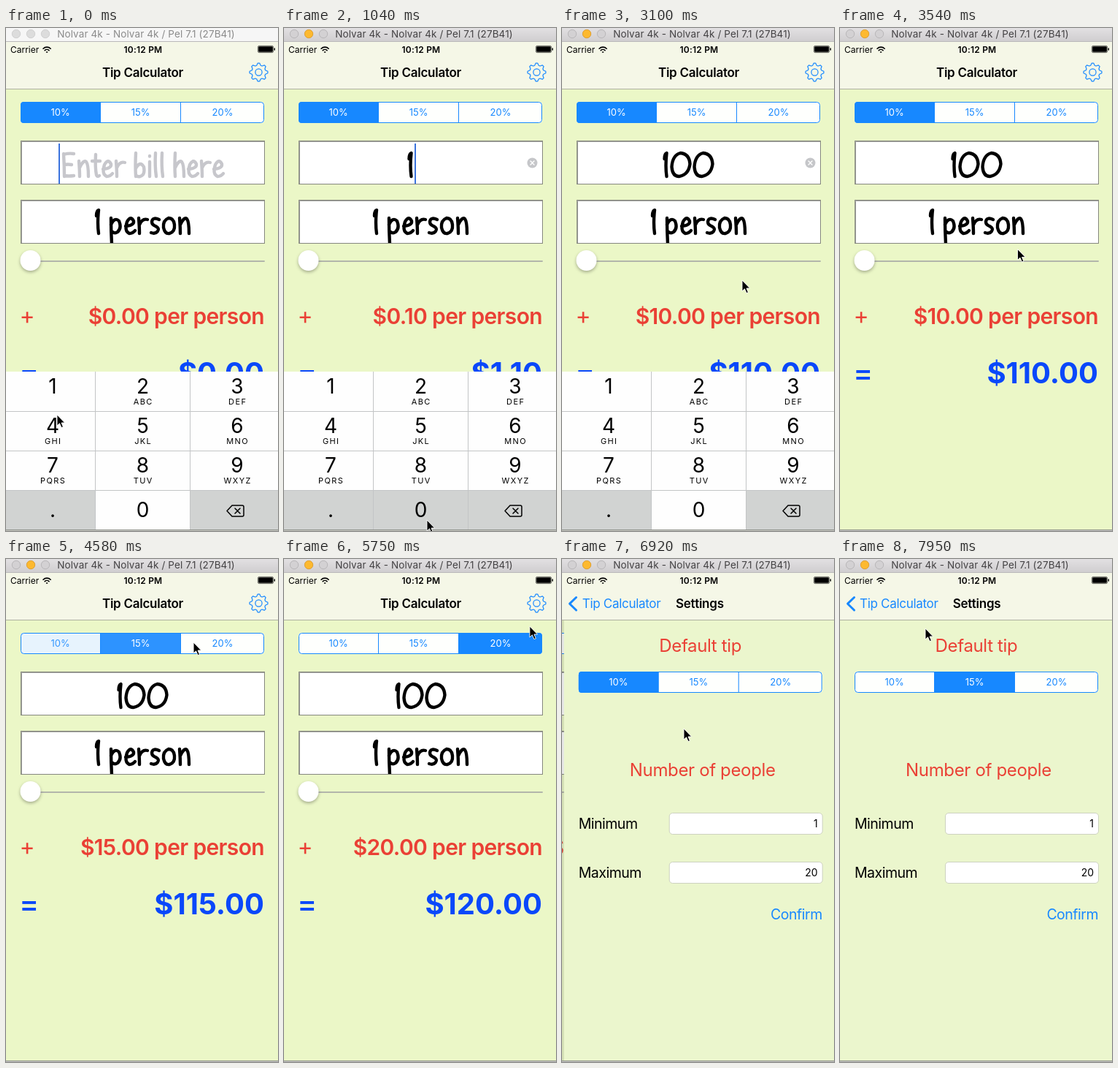
An HTML page that plays this animation: 373x688 px, repeating every 8 s.

```html
<!DOCTYPE html>
<html lang="en">
<head>
<meta charset="utf-8">
<title>Tip Calculator</title>
<style>
  html, body { margin: 0; width: 100%; height: 100%; overflow: hidden; background: #ebf7c7; }
  svg { display: block; width: 100vw; height: 100vh; font-family: Inter, "Liberation Sans", sans-serif; }
  text { white-space: pre; }
  .mid { text-anchor: middle; }
  .end { text-anchor: end; }
  .semi { font-weight: 600; }
  .bold { font-weight: 700; }
  .line { fill: none; stroke-linecap: round; stroke-linejoin: round; }
  .blue { fill: #1788ff; }
  .red { fill: #ea4035; }
  .knob { filter: drop-shadow(0 2px 2px rgba(0, 0, 0, .3)); }
</style>
</head>
<body>
<svg id="stage" viewBox="0 0 373 688"></svg>
<script>
const LOOP = 8000, STEP = 147.3;
const WIDTH = 373;
const BLUE = [23, 136, 255];

// Pen strokes of the hand lettering: [advance, path], baseline at y = 0.
const GLYPHS = {
  ' ': [9, ''],
  '0': [31, 'M15-34Q4-31 3-15Q4-2 13-2Q26-4 28-19Q27-33 15-34Z'],
  '1': [10, 'M3-26Q3-33 6-34Q4-16 6-2'],
  E: [22, 'M4-33Q5-16 5-2M4-32Q11-34 18-33M5-18Q10-19 15-18M5-3Q11-2 18-3'],
  b: [19, 'M4-34Q3-16 4-2M4-13Q10-24 15-15Q17-4 10-2Q6-1 4-4'],
  e: [18, 'M3-12Q15-13 14-19Q10-27 5-18Q1-5 8-2Q13-2 16-6'],
  h: [19, 'M4-34Q3-16 4-2M4-14Q9-25 13-22Q16-18 16-2'],
  i: [8, 'M4-22V-2M4-30v.5'],
  l: [9, 'M4-34Q3-16 5-2'],
  n: [19, 'M3-23Q4-10 4-2M4-14Q9-25 13-22Q16-18 16-2'],
  o: [22, 'M10-23Q2-20 3-10Q5-1 11-2Q19-4 18-14Q17-23 10-23'],
  p: [21, 'M4-23Q4-4 5 12M4-14Q9-25 15-19Q19-9 13-4Q9-1 5-5'],
  r: [17, 'M3-23Q4-10 4-2M4-14Q8-23 15-21'],
  s: [17, 'M14-21Q5-25 4-18Q4-14 9-12Q15-9 12-5Q9-1 3-3'],
  t: [14, 'M7-32Q6-14 8-4Q9-1 12-3M2-23H13'],
};

// Pointer positions: [time, x, y]
const POINTER = [
  [0, 70, 529], [147, 70, 515], [295, 66, 497], [442, 70, 500], [589, 190, 668],
  [1031, 196, 673], [1473, 196, 672], [1620, 208, 630], [1768, 235, 510], [1915, 280, 384],
  [2062, 296, 350], [2357, 262, 318], [2651, 205, 330], [2946, 247, 345], [3388, 247, 345],
  [3682, 240, 260], [3977, 200, 140], [4124, 186, 112], [4418, 192, 114], [4566, 257, 114],
  [4713, 290, 115], [5008, 294, 118], [5450, 250, 125], [5598, 305, 108], [5745, 337, 92],
  [5892, 346, 68], [6187, 345, 60], [6481, 345, 60], [6628, 310, 100], [6775, 240, 180],
  [6923, 167, 232], [7217, 180, 190], [7512, 184, 164], [7660, 184, 162], [7954, 117, 95],
];

const clamp = v => Math.min(1, Math.max(0, v));
const mix = (a, b, p) => a + (b - a) * p;
const within = (t, from, to) => t >= from && t < to;

const text = (x, y, size, string, cls = '', spacing = 0, extra = '') =>
  `<text x="${x}" y="${y}" font-size="${size}" class="${cls}" letter-spacing="${spacing}" ${extra}>${string}</text>`;
const rect = (x, y, w, h, fill, extra = '') =>
  `<rect x="${x}" y="${y}" width="${w}" height="${h}" fill="${fill}" ${extra}/>`;
const textWidth = string => [...string].reduce((sum, c) => sum + GLYPHS[c][0], 0);

function lettering(string, center, baseline, color) {
  let x = center - textWidth(string) / 2;
  const label = text(center, baseline, 36, string, 'mid', 0, 'fill="none"');
  const strokes = [...string].map(c => {
    const [advance, path] = GLYPHS[c];
    const stroke = `<path d="${path}" transform="translate(${x} ${baseline})"/>`;
    x += advance;
    return stroke;
  }).join('');
  return `${label}<g class="line" stroke="${color}" stroke-width="4.4">${strokes}</g>`;
}

function segments(id, y) {
  const edges = [0, 109.5, 219.5, 334];
  const cells = ['10%', '15%', '20%'].map((label, i) =>
    rect(edges[i], 0, edges[i + 1] - edges[i], 29, '#1788ff', 'class="cell" clip-path="url(#pill)"') +
    text([54.7, 164.7, 277][i], 19.2, 13, label, 'mid label')).join('');
  return `<g id="${id}" transform="translate(20 ${y})">
    ${rect(0, 0, 334, 29, '#fefffd', 'rx="4"')}${cells}
    <path d="M109.5 0V29M219.5 0V29" stroke="#1788ff"/>
    ${rect(.5, .5, 333, 28, 'none', 'rx="4" stroke="#1788ff"')}</g>`;
}

function keypad() {
  const columns = [[0, 122.5, 64], [122.5, 130, 187.5], [252.5, 121, 317]];
  const letters = ['', 'ABC', 'DEF', 'GHI', 'JKL', 'MNO', 'PQRS', 'TUV', 'WXYZ'];
  const key = (name, column, row, hint = '') => {
    const [x, w, center] = columns[column], top = 470 + row * 54;
    const fill = row === 3 && column !== 1 ? '#d1d3d2' : '#fefefe';
    return rect(x, top, w, 54, fill, `id="key${name}"`) +
      text(center, top + (row === 3 ? 37 : 30.3), 28, name, 'mid') +
      text(center + .7, top + 45, 11, hint, 'mid', 1.4);
  };
  return letters.map((hint, i) => key(String(i + 1), i % 3, Math.floor(i / 3), hint)).join('') +
    key('.', 0, 3) + key('0', 1, 3) + key('', 2, 3) +
    `<path d="M0 524.5H373M0 578.5H373M0 632.5H373M122.5 470V686M252.5 470V686" stroke="#c3c5c6"/>
     <path class="line" d="M303 660.5l7-7.5h14q2 0 2 2v11q0 2-2 2h-14zM314 657l7 7m0-7l-7 7" stroke="#000" stroke-width="1.5"/>`;
}

function gear() {
  const points = Array.from({ length: 32 }, (_, i) => {
    const radius = i % 4 < 2 ? 12.5 : 9.6, angle = (i - .5) * Math.PI / 16;
    return [346.5 + radius * Math.sin(angle), 60.5 - radius * Math.cos(angle)].map(v => v.toFixed(2));
  });
  return `<g id="gear" class="line" stroke="#1788ff" stroke-width="1.2">
    <polygon points="${points.join(' ')}"/><circle cx="346.5" cy="60.5" r="4.6"/></g>`;
}

const inputBox = y => rect(20.5, y + .5, 334, 59, '#fff', 'stroke="#85877f"') +
  `<path d="M21.5 ${y + 59}V${y + 1.5}H354" fill="none" stroke="#a0a19c"/>`;
const settingRow = (y, label, value) =>
  text(20, y + 22, 19.5, label, '', -.5) +
  rect(144.5, y + .5, 210, 29, '#fff', 'rx="4.5" stroke="#cdd2c0"') +
  text(348, y + 20.3, 14, value, 'end');

const stage = document.getElementById('stage');
stage.innerHTML = `
  <defs>
    <clipPath id="pill"><rect width="334" height="29" rx="4"/></clipPath>
    <clipPath id="peopleClip"><rect x="21" y="236" width="333" height="58"/></clipPath>
    <clipPath id="screen"><rect width="373" height="686"/></clipPath>
    <linearGradient id="chrome" x2="0" y2="1"><stop stop-color="#e2e0e2"/><stop offset="1" stop-color="#cfcdcf"/></linearGradient>
  </defs>
  <g clip-path="url(#screen)">
    <g id="home">
      ${rect(0, 84, 373, 602, '#ebf7c7')}
      ${segments('tips', 101)}
      ${inputBox(154)}<g id="bill"></g>
      ${rect(0, 158, 2, 55, '#3a73dd', 'id="caret"')}
      <g id="clear"><circle cx="340.5" cy="184.5" r="7" fill="#c5c6c9"/>
        <path class="line" d="M338 182l5 5m0-5l-5 5" stroke="#fff" stroke-width="1.4"/></g>
      ${inputBox(235)}<g clip-path="url(#peopleClip)">${lettering('1 person', 187.5, 283, '#000')}</g>
      ${rect(20, 318, 335, 2, '#b2b6ab', 'rx="1"')}
      <circle class="knob" cx="33.5" cy="318" r="14" fill="#fff"/>
      ${text(18.5, 405.3, 32, '+', 'red')}
      ${text(354, 404.5, 30, '', 'red end semi', -.65, 'id="tip"')}
      ${text(18, 486, 41, '=', '', 0, 'fill="#0a48fa" font-weight="500"')}
      ${text(354, 486, 40, '', 'end bold', 0, 'id="total" fill="#0a48fa"')}
    </g>
    ${rect(0, 84, 373, 602, '#000', 'id="dim"')}
    <g id="keypad">${keypad()}</g>
    <g id="settings">
      ${rect(0, 84, 373, 602, '#ebf6cd')}
      ${text(187, 127, 24, 'Default tip', 'mid red', -.35)}
      ${segments('defaults', 154)}
      ${text(190, 297, 24, 'Number of people', 'mid red', -.35)}
      ${settingRow(347, 'Minimum', '1')}
      ${settingRow(414, 'Maximum', '20')}
      ${text(354, 492.5, 19.5, 'Confirm', 'end blue', -.5)}
    </g>
    ${rect(0, 19, 373, 64, '#f5f7e7')}${rect(0, 83, 373, 1, '#aeb1a1')}
    ${text(6, 33.5, 12, 'Carrier')}
    <g class="line" stroke="#000" stroke-width="1.6">
      <path d="M51 28.2a7.2 7.2 0 0 1 10.2 0M53.2 30.6a4.2 4.2 0 0 1 5.8 0M55.6 33h1"/></g>
    ${text(188, 33.5, 12, '10:12 PM', 'mid semi', .2)}
    ${rect(345.4, 24.4, 21.2, 9.2, 'none', 'rx="1.8" stroke="#000" stroke-width=".6"')}
    ${rect(346.2, 25.3, 19.6, 7.4, '#000', 'rx="1"')}${rect(367.6, 27.3, 1.4, 3.4, '#000', 'rx=".7"')}
    ${text(187.5, 67, 17, 'Tip Calculator', 'mid semi', -.26, 'id="homeTitle"')}
    ${gear()}
    <path id="chevron" class="line" d="M19.5 52.5L10.5 61.2L19.5 70" stroke="#1788ff" stroke-width="3"/>
    ${text(27, 67, 17, 'Tip Calculator', 'blue', -.3, 'id="backLabel"')}
    ${text(187.5, 67, 17, 'Settings', 'mid semi', -.26, 'id="settingsTitle"')}
  </g>
  ${rect(0, 686, 373, 1, '#8b8d86')}${rect(0, 687, 373, 1, '#c9cac5')}
  ${rect(0, 0, 373, 19, '', 'id="bar"')}${rect(0, 18, 373, 1, '#bab9ba')}
  <g id="lights">${[14, 34, 54].map(x => `<circle cx="${x}" cy="8" r="5.7"/>`).join('')}</g>
  ${text(192, 13, 13.5, 'Nolvar 4k - Nolvar 4k / Pel 7.1 (27B41)', 'mid', .1, 'id="windowTitle"')}
  <path id="pointer" d="M0 0V15L3.5 11.8L6 17.6L8.4 16.6L6 11H10.6Z" fill="#000" stroke="#fff" stroke-width=".9"/>`;

const el = Object.fromEntries([...stage.querySelectorAll('[id]')].map(node => [node.id, node]));
const set = (node, attributes) => {
  for (const [name, value] of Object.entries(attributes)) node.setAttribute(name, value);
};
const shift = (node, x, y = 0) => node.setAttribute('transform', `translate(${x} ${y})`);

function shade(control, weights) {
  const labels = control.querySelectorAll('.label');
  control.querySelectorAll('.cell').forEach((cell, i) => {
    set(cell, { 'fill-opacity': weights[i] });
    const lit = clamp(weights[i] * 1.2);
    set(labels[i], { fill: `rgb(${BLUE.map(c => mix(c, 255, lit)).join()})` });
  });
}

function pointerAt(t) {
  const next = POINTER.findIndex(([time]) => time > t);
  if (next < 0) return POINTER.at(-1).slice(1);
  const [t0, x0, y0] = POINTER[next - 1], [t1, x1, y1] = POINTER[next];
  const p = (t - t0) / (t1 - t0);
  return [mix(x0, x1, p), mix(y0, y1, p)];
}

function drawWindow(t) {
  const active = t > 100;
  set(el.bar, { fill: active ? 'url(#chrome)' : '#f6f6f6' });
  set(el.windowTitle, { fill: active ? '#444244' : '#8b8b8b' });
  [...el.lights.children].forEach((light, i) => set(light, active
    ? { fill: i === 1 ? '#fdb92f' : '#d3d1d3', stroke: i === 1 ? '#dea034' : '#b9b7b9' }
    : { fill: '#dcdcdc', stroke: '#d0d0d0' }));
}

function drawHome(t) {
  const bill = t < 430 ? '' : t < 1160 ? '1' : t < 1450 ? '10' : '100';
  const editing = t < 3230;
  const center = bill && editing ? 173.5 : 187.5;
  const half = textWidth(bill || 'Enter bill here') / 2;
  const caretOn = editing && (t < 1900 || t % 1000 >= 500);
  el.bill.innerHTML = lettering(bill || 'Enter bill here', center, 205, bill ? '#000' : '#c7c7cc');
  set(el.caret, { x: bill ? center + half + .5 : center - half - 3, opacity: +caretOn });
  set(el.clear, { opacity: +(bill !== '' && editing) });

  const toMiddle = clamp((t - 4350) / 240), toLast = clamp((t - 4850) / 240);
  shade(el.tips, [1 - toMiddle, toMiddle - toLast, toLast]);
  const rate = toLast ? .2 : toMiddle ? .15 : .1;
  el.tip.textContent = `$${(bill * rate).toFixed(2)} per person`;
  el.total.textContent = `$${(bill * (1 + rate)).toFixed(2)}`;

  const hide = 1 - (1 - clamp((t - 3230) / 280)) ** 2;
  shift(el.keypad, 0, 216 * hide);
  set(el.key1, { fill: within(t, 280, 430) ? '#d1d3d2' : '#fefefe' });
  set(el.key0, { fill: within(t, 870, 1160) || within(t, 1310, 1450) ? '#d1d3d2' : '#fefefe' });
}

function drawPush(t) {
  const swing = Math.max(0, t - 6440) * .0145;
  const left = (1 + swing) * Math.exp(-swing), done = 1 - left;   // critically damped spring
  shift(el.home, -112 * done);
  set(el.dim, { opacity: .1 * done });
  shift(el.settings, t < 7000 ? WIDTH * left : 0);
  shift(el.homeTitle, -107 * done);
  shift(el.backLabel, 105 * left);
  shift(el.settingsTitle, 186 * left);
  for (const node of [el.homeTitle, el.gear]) set(node, { opacity: clamp(1 - done * 1.5) });
  for (const node of [el.backLabel, el.chevron, el.settingsTitle]) set(node, { opacity: done });

  const picked = clamp((t - 7630) / 240);
  shade(el.defaults, [1 - picked, picked, 0]);
}

let lastStep = -1;
function frame() {
  const step = Math.floor((performance.now() % LOOP + 14) / STEP);
  if (step !== lastStep) {
    const t = step * STEP;
    drawWindow(t);
    drawHome(t);
    drawPush(t);
    shift(el.pointer, ...pointerAt(t));
    lastStep = step;
  }
  requestAnimationFrame(frame);
}
frame();
</script>
</body>
</html>
```
